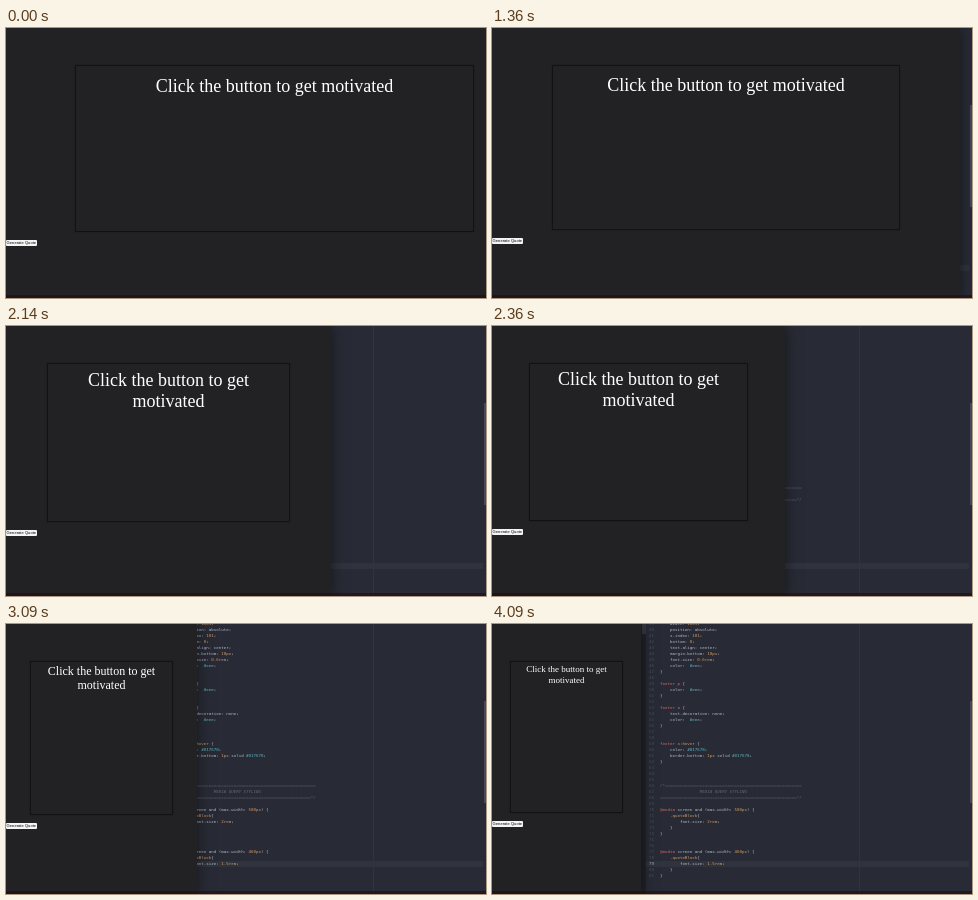
Write an HTML page that moves like this. It is 480 px wide and 270 px high and loops after 5280 ms.

```html
<!DOCTYPE html>
<html lang="en">
<head>
<meta charset="utf-8">
<title>Responsive quote box</title>
<style>
html, body { margin: 0; width: 100%; height: 100%; overflow: hidden; background: #282b35; }
.stage { position: relative; width: 480px; height: 270px; overflow: hidden; background: #282b35; }
.stage > *, .editor > * { position: absolute; }

.editor { inset: 0; }
.side { left: 0; top: 0; width: 154px; height: 270px; background: #202229; }
.tab { left: 150px; top: 0; width: 4px; height: 10px; background: #343842; }
.row { left: 154px; top: 237px; width: 323px; height: 6px; background: #2f333d; }
.guide { left: 367px; top: 0; width: 1px; height: 270px; background: #30343e; }
.thumb { left: 478px; top: 77px; width: 2px; height: 102px; background: #454a55; }
pre {
  top: -3px; margin: 0;
  font: 41.3px/60px "DejaVu Sans Mono", monospace;
  color: #b4bac6;
  transform: scale(.1); transform-origin: 0 0;
}
.nums { left: 157px; color: #4a5060; }
.nums b { font-weight: normal; color: #b4bac6; }
.code { left: 168px; }
.hex { color: #5cb8c4; }
.sel { color: #d9656f; }
.num { color: #d19a66; }
.note { color: #626876; font-style: italic; }

.page {
  left: 0; top: 0; width: 537px; height: 270px;
  background: #222123;
  box-shadow: 0 0 14px rgba(0, 0, 0, .5);
  container-type: inline-size;
}
.quote {
  width: 70%; height: 144.5px; padding: 2%;
  margin: 36.5px auto 0;
  border: 1px solid #121113;
  box-shadow: 0 0 2px rgba(0, 0, 0, .25);
  font: 18px/1.15 "Liberation Serif", Times, serif;
  text-align: center; color: #fff;
}
@container (max-width: 217.5px) { .quote { font-size: 12px; } }
@container (max-width: 172.5px) { .quote { font-size: 9px; } }
.button {
  width: 31px; height: 6px; margin-top: 8px;
  background: #f4f4f4; border-radius: 1px; overflow: hidden;
}
.button span {
  display: block; width: 300px; padding-left: 6px;
  font: 41.2px/58px "Liberation Sans", Arial, sans-serif;
  color: #000; white-space: nowrap;
  transform: scale(.1); transform-origin: 0 0;
}
.base { left: 0; top: 267px; width: 480px; height: 3px; background: rgba(30, 12, 18, .6); }
</style>
</head>
<body>
<div class="stage">
  <div class="editor">
    <div class="side"></div>
    <div class="tab"></div>
    <div class="row"></div>
    <div class="guide"></div>
    <div class="thumb"></div>
    <pre class="nums"></pre>
    <pre class="code">    width: 100%;
    position: absolute;
    z-index: 101;
    bottom: 0;
    text-align: center;
    margin-bottom: 10px;
    font-size: 0.6rem;
    color:  #eee;
}

footer p {
    color:  #eee;
}

footer a {
    text-decoration: none;
    color:  #eee;
}


footer a:hover {
    color: #017678;
    border-bottom: 1px solid #017678;
}



/*=======================================================
                MEDIA QUERY STYLING
=======================================================*/

@media screen and (max-width: 580px) {
    .quoteBlock{
        font-size: 2rem;
    }
}


@media screen and (max-width: 460px) {
    .quoteBlock{
        font-size: 1.5rem;
    }
}</pre>
  </div>
  <div class="page">
    <div class="quote">Click the button to get motivated</div>
    <div class="button"><span>Generate Quote</span></div>
  </div>
  <div class="base"></div>
</div>
<script>
const LOOP = 5280;
const page = document.querySelector('.page');
const code = document.querySelector('.code');
const nums = document.querySelector('.nums');

// Syntax colours
const token = /(#\w+)|(@media|footer \w)|(\d[\w.%]*|\.quoteBlock|:hover)/g;
const span = (kind, text) => `<span class="${kind}">${text}</span>`;
const paint = line => /^\/\*|==|MEDIA/.test(line)
  ? span('note', line)
  : line.replace(token, (text, hex, sel) => span(hex ? 'hex' : sel ? 'sel' : 'num', text));
code.innerHTML = code.textContent.split('\n').map(paint).join('\n');
nums.innerHTML = Array.from({ length: 43 }, (_, i) => i + 39)
  .map(n => n === 79 ? `<b>${n}</b>` : n).join('\n');

// Window width over time: [ms, px]
const keys = [
  [0, 537], [1080, 537], [1090, 529], [1180, 512], [1320, 482], [1360, 468],
  [1500, 446], [1680, 408], [2000, 345], [2140, 325], [2550, 255], [2640, 243],
  [3090, 191], [3140, 185], [3300, 167], [3460, 155], [3640, 149], [LOOP, 149]
];
const widthAt = t => {
  const i = keys.findIndex(k => k[0] > t);
  const [t0, w0] = keys[i - 1], [t1, w1] = keys[i];
  return w0 + (w1 - w0) * (t - t0) / (t1 - t0);
};

// The window moves in small jumps: [first, last, count]
const bursts = [
  [1090, 1180, 2], [1320, 1360, 2], [1500, 1770, 4], [1847, 2000, 3],
  [2050, 2140, 3], [2180, 2550, 6], [2590, 2640, 2], [2680, 3090, 10], [3140, 3640, 12]
];
const ticks = [0, ...bursts.flatMap(([from, to, n]) =>
  Array.from({ length: n }, (_, i) => from + (to - from) * i / (n - 1)))];

const start = performance.now();
function draw(now) {
  const t = Math.max(0, now - start) % LOOP;
  const tick = ticks.filter(x => x <= t + .01).pop();
  page.style.width = widthAt(tick).toFixed(2) + 'px';
  requestAnimationFrame(draw);
}
draw(start);
</script>
</body>
</html>
```
